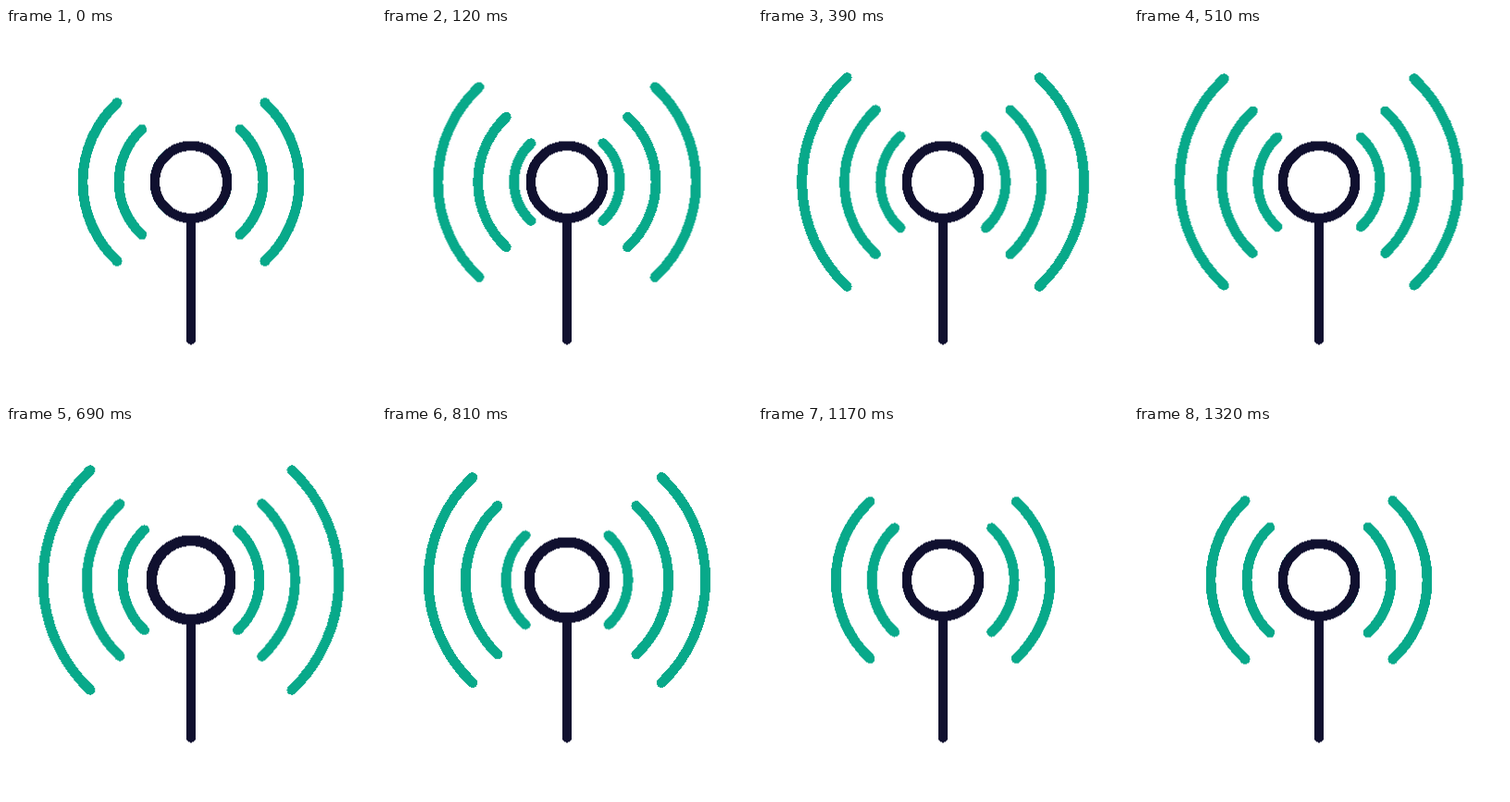
Write an HTML page without scripts that moves like this. It is 400 by 400 pixels and loops after 2340 ms.

```html
<!DOCTYPE html>
<html lang="en">
<head>
<meta charset="utf-8">
<title>Antenna signal</title>
<style>
  html, body { margin: 0; width: 100%; height: 100%; overflow: hidden; background: #fff; }
  svg { display: block; width: 100%; height: 100%; shape-rendering: crispEdges; }

  .wave, .mast { fill: none; stroke-linecap: round; }
  .wave { stroke: #08a98a; stroke-width: 10.8; }
  .wave path { vector-effect: non-scaling-stroke; }
  .mast, .ring { stroke: #10102f; stroke-width: 10.5; }
  .ring { fill: #fff; }

  .wave path, .ring {
    transform-origin: 0 0;
    animation: var(--move) 2340ms cubic-bezier(.37, 0, .63, 1) infinite;
  }
  .inner { --move: inner; }
  .middle { --move: middle; }
  .outer { --move: outer; }
  .ring { --move: beat; }

  /* out, partial dip, out again, settle just past rest */
  @keyframes inner {
    0%, 56.41%, 100% { transform: scale(1); }
    10.26% { transform: scale(1.923); }
    19.87% { transform: scale(1.678); }
    30.13% { transform: scale(1.9); }
    44.44% { transform: scale(.972); }
  }
  @keyframes middle {
    0%, 56.41%, 100% { transform: scale(1); }
    10.26% { transform: scale(1.4615); }
    19.87% { transform: scale(1.339); }
    31.2% { transform: scale(1.45); }
    48.72% { transform: scale(.986); }
  }
  @keyframes outer {
    0%, 56.41%, 100% { transform: scale(1); }
    10.26% { transform: scale(1.38, 1.396); }
    19.87% { transform: scale(1.278, 1.294); }
    28.63% { transform: scale(1.368, 1.39); }
    47.44% { transform: scale(.988); }
  }
  @keyframes beat {
    0%, 23.08%, 39.74%, 100% { transform: scale(1); }
    29.49% { transform: scale(1.09); }
  }
</style>
</head>
<body>
<svg viewBox="0 0 400 400">
  <g transform="translate(200 166.5)">
    <g class="wave">
      <path class="outer" d="M-79.8-85.6A117 117 0 0 0-79.8 85.6M79.8-85.6A117 117 0 0 1 79.8 85.6"/>
      <path class="middle" d="M-53.2-57A78 78 0 0 0-53.2 57M53.2-57A78 78 0 0 1 53.2 57"/>
      <path class="inner" d="M-26.6-28.5A39 39 0 0 0-26.6 28.5M26.6-28.5A39 39 0 0 1 26.6 28.5"/>
    </g>
    <path class="mast" d="M0 42V170.5"/>
    <circle class="ring" r="39.2"/>
  </g>
</svg>
</body>
</html>
```
